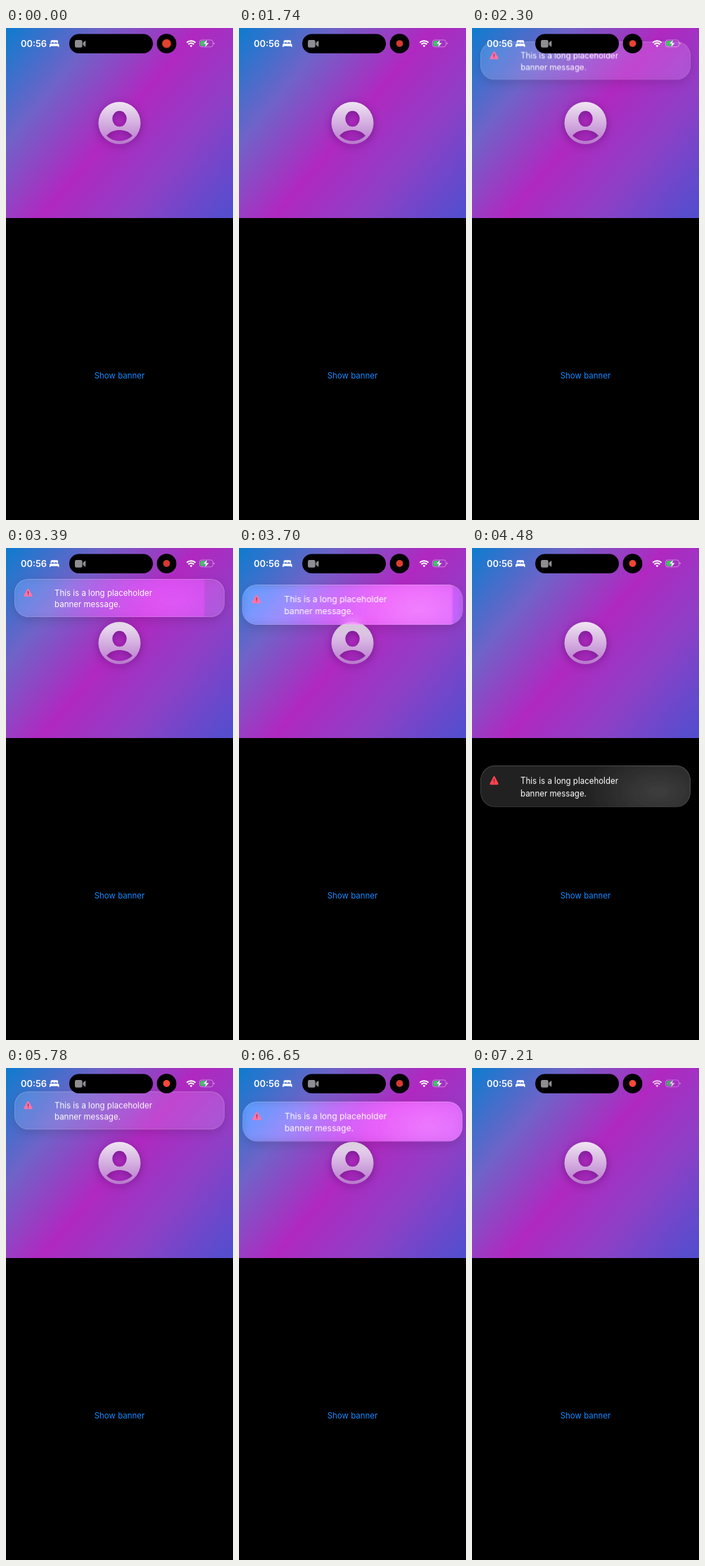
Animation of 323x699 px, one loop 7.28 s. Source, as an HTML page:

```html
<!DOCTYPE html>
<html lang="en">
<head>
<meta charset="utf-8">
<title>Banner</title>
<style>
  :root { --loop: 7280ms linear infinite; }
  html, body { margin: 0; width: 100%; height: 100%; overflow: hidden; background: #000; }
  .stage {
    position: relative; width: 323px; height: 699px; overflow: hidden;
    background: #000; font: 400 11.5px/16px Inter, "Liberation Sans", sans-serif;
  }
  .stage > * { position: absolute; }
  .header {
    left: 0; top: 0; width: 323px; height: 270px;
    background: linear-gradient(129.9deg, #0d7ccf, #6f63c8 25%, #b028c0 50%, #8f3fc6 72%, #4f4fcf);
  }
  .layer { left: 0; top: 0; width: 323px; height: 270px; }
  .avatar { filter: drop-shadow(0 3px 6px rgba(50, 0, 70, .4)); }
  .button {
    left: 0; width: 323px; top: 486px; text-align: center; color: #1489ff;
    animation: tap var(--loop);
  }

  .banner {
    left: 12px; top: 44px; width: 299px; height: 54px; border-radius: 20px;
    transform-origin: 50% 0; color: #fff;
    background: rgba(255, 255, 255, .13);
    box-shadow: 0 5px 14px rgba(0, 0, 0, .13);
    animation: travel var(--loop), fade var(--loop), lens var(--loop);
  }
  .banner > * { position: absolute; }
  .glow { inset: 0; border-radius: 20px; overflow: hidden; }
  .glow i { position: absolute; left: 0; top: 0; width: 100%; height: 100%; }
  .touch {
    background: radial-gradient(110px 60px at 253px 34px, rgba(255, 255, 255, .17), transparent);
    animation: touch var(--loop);
  }
  .pink {
    background: radial-gradient(175px 110px at 250px 28px, currentColor 8%, transparent);
    animation: pink var(--loop);
  }
  .edge {
    inset: 0; border-radius: 20px;
    box-shadow: inset 0 0 0 .7px rgba(255, 255, 255, .2), inset 0 .8px .8px rgba(255, 255, 255, .12);
  }
  .ring {
    left: 123px; top: 1px; width: 50px; height: 18px; box-sizing: border-box;
    border: 4px solid rgba(255, 240, 255, .75); border-top-width: 2px; border-radius: 50%;
    filter: blur(1.6px); animation: ring var(--loop);
  }
  .warn { left: 12.5px; top: 13px; animation: warn var(--loop); }
  .message { left: 57px; top: 11.5px; margin: 0; white-space: nowrap; }

  .status { left: 0; top: 0; }
  .clock { font: 600 12.8px Inter, "Liberation Sans", sans-serif; }
  .dot { transform-origin: 228.5px 22px; animation: shrink var(--loop), pulse var(--loop); }
  .signal { animation: signal var(--loop); }

  @keyframes tap {
    0%, 26.1% { opacity: 1; }
    26.8%, 28.2% { opacity: .4; }
    30.9%, 72.1% { opacity: 1; }
    72.8%, 74.6% { opacity: .4; }
    77.3%, 100% { opacity: 1; }
  }
  @keyframes travel {
    0% { transform: translateY(-104px); }
    28.57%, 75.14% {
      transform: translateY(-104px);
      animation-timing-function: linear(0, .23, .54, .75, .874, .939, .971, .987, 1);
    }
    36.4%, 46.57% { transform: none; animation-timing-function: ease-out; }
    49.45% { transform: translateY(4px) scale(1.05); }
    51.51% { transform: translateY(10px) scale(1.05, 1.06); animation-timing-function: ease-in; }
    55.49% { transform: translateY(64px) scale(1.03, 1.06); }
    56.73% { transform: translateY(94px) scale(1.02, 1.055); }
    61.54% { transform: translateY(265px) scale(1, 1.09); animation-timing-function: ease-out; }
    64.56% { transform: translateY(281px) scale(1, 1.04); }
    64.57% { transform: translateY(-104px); }
    82.97%, 89.01% { transform: none; animation-timing-function: ease-out; }
    92.03% { transform: translateY(4px) scale(1.05); }
    94.09% { transform: translateY(-10px) scale(1.04, 1.06); }
    97.94%, 100% { transform: translateY(-110px); }
  }
  @keyframes fade {
    0%, 28.57% { opacity: 0; }
    30.2%, 62.09% { opacity: 1; }
    64.56%, 75.14% { opacity: 0; }
    76.8%, 96.5% { opacity: 1; }
    97.94%, 100% { opacity: 0; }
  }
  @keyframes lens {
    0%, 45.6% { backdrop-filter: blur(6px) brightness(1.05); }
    46.57% { backdrop-filter: blur(6px) brightness(1.1); }
    49.45%, 56.73% { backdrop-filter: blur(6px) brightness(1.28); }
    61.54%, 89.01% { backdrop-filter: blur(6px) brightness(1.05); }
    91%, 94% { backdrop-filter: blur(6px) brightness(1.25); }
    97.94%, 100% { backdrop-filter: blur(6px) brightness(1.05); }
  }
  @keyframes touch {
    0%, 45.6% { opacity: 0; transform: translateX(-30px); }
    46.57% { opacity: .4; transform: translateX(-30px); }
    49.45% { opacity: 1; }
    56.73% { opacity: 1; transform: translateX(5px); }
    61.54% { opacity: .8; transform: none; }
    64.56%, 89.01% { opacity: 0; transform: none; }
    91%, 94% { opacity: 1; }
    97.94%, 100% { opacity: 0; transform: none; }
  }
  @keyframes pink {
    0%, 45.6% { opacity: 0; color: #e64cff; transform: translateX(-28px); }
    46.57% { opacity: .7; color: #e64cff; transform: translateX(-28px); }
    49.45% { opacity: .8; color: #f060ff; }
    56.73% { opacity: .92; color: #ff90fa; transform: translateX(8px); }
    59.6%, 89.01% { opacity: 0; color: #e64cff; transform: none; }
    91%, 94% { opacity: .75; color: #f060ff; }
    97.94%, 100% { opacity: 0; color: #e64cff; transform: none; }
  }
  @keyframes ring {
    0%, 54.4% { opacity: 0; }
    56.4%, 57% { opacity: .9; }
    58%, 100% { opacity: 0; }
  }
  @keyframes warn {
    0%, 57.5% { color: #ff74a8; }
    60%, 64.56% { color: #ff4550; }
    64.57%, 100% { color: #ff74a8; }
  }
  @keyframes shrink {
    0% { transform: scale(1.3); animation-timing-function: ease-in-out; }
    10.16%, 100% { transform: none; }
  }
  @keyframes pulse {
    0% { fill: #e2432f; }
    4.8%, 26%, 47.1%, 68.3%, 89.4% { fill: #d23b2d; animation-timing-function: ease-in-out; }
    15.4%, 36.5%, 57.7%, 78.8%, 100% { fill: #ff4836; animation-timing-function: ease-in-out; }
  }
  @keyframes signal {
    0%, 97.9% { opacity: 1; }
    98.9%, 100% { opacity: .76; }
  }
</style>
</head>
<body>
<div class="stage">
  <div class="header"></div>

  <svg class="layer avatar" viewBox="0 0 323 270">
    <defs>
      <linearGradient id="pearl" x1="0" y1="0" x2="0" y2="1">
        <stop offset="0" stop-color="#f0e6f3"/>
        <stop offset="1" stop-color="#b878cc"/>
      </linearGradient>
    </defs>
    <path fill="url(#pearl)" fill-rule="evenodd" d="M131.5 135a30 30 0 0 1 60 0a30 30 0 0 1-60 0Z
      M151.3 129a10.2 11.2 0 0 0 20.4 0a10.2 11.2 0 0 0-20.4 0Z
      M143 153C148 147 155 145 161.5 145S175 147 180 153C175 158 168 160.5 161.5 160.5S148 158 143 153Z"/>
  </svg>

  <div class="button">Show banner</div>

  <div class="banner">
    <div class="glow"><i class="pink"></i><i class="touch"></i></div>
    <div class="ring"></div>
    <div class="edge"></div>
    <svg class="warn" width="13" height="13" viewBox="0 0 13 13">
      <path d="M6.5 2L11.4 10.8H1.6Z" fill="currentColor" stroke="currentColor" stroke-width="2.4" stroke-linejoin="round"/>
      <path d="M6.5 4.6V7.6M6.5 9.4V9.5" stroke="#300018" stroke-opacity=".6" stroke-width="1.3" stroke-linecap="round"/>
    </svg>
    <p class="message">This is a long placeholder<br>banner message.</p>
  </div>

  <svg class="status" width="323" height="44" viewBox="0 0 323 44" fill="#fff">
    <text class="clock" x="21" y="26.7">00:56</text>
    <path d="M63.5 21.5V19Q63.5 17.3 65.2 17.3H72.3Q74 17.3 74 19V21.5H72.7Q72.5 20.2 71.4 20.2H70.2Q69.2 20.2 69.1 21.5H68.4Q68.3 20.2 67.3 20.2H66.1Q65 20.2 64.8 21.5Z"/>
    <path d="M62 27V23.8Q62 22.2 63.6 22.2H73.9Q75.5 22.2 75.5 23.8V27H74.1V25.7H63.4V27Z"/>
    <rect x="90" y="8.5" width="119" height="27.5" rx="13.75" fill="#000"/>
    <g fill="#8d8d92">
      <rect x="98" y="17" width="10.6" height="10.8" rx="2.2"/>
      <path d="M109.4 21L112.2 18.5Q113.3 17.9 113.3 19V25.8Q113.3 26.9 112.2 26.3L109.4 23.8Z"/>
    </g>
    <circle cx="228.5" cy="22.2" r="13.9" fill="#000"/>
    <circle class="dot" cx="228.5" cy="22" r="4.9"/>
    <g class="signal">
      <g fill="none" stroke="#fff" stroke-width="2">
        <path d="M257.2 20.7A8.8 8.8 0 0 1 269.6 20.7"/>
        <path d="M259.5 23.2A5.6 5.6 0 0 1 267.3 23.2"/>
      </g>
      <path d="M263.4 27.2L261.4 25.1A2.9 2.9 0 0 1 265.4 25.1Z"/>
      <rect x="275.4" y="17" width="19" height="9.8" rx="3" fill="none" stroke="#fff" stroke-opacity=".45" stroke-width=".9"/>
      <path d="M295.5 20.2Q297 20.7 297 21.9T295.5 23.6Z" fill-opacity=".5"/>
      <path d="M284 18.2V25.6H278.6Q276.6 25.6 276.6 23.6V20.2Q276.6 18.2 278.6 18.2Z" fill="#37c95c"/>
      <path d="M286.4 16.3L280.4 22.6H284L282.9 27.7L289 21.2H285.3Z" stroke="#7a55b8" stroke-width=".5"/>
    </g>
  </svg>
</div>
</body>
</html>
```
